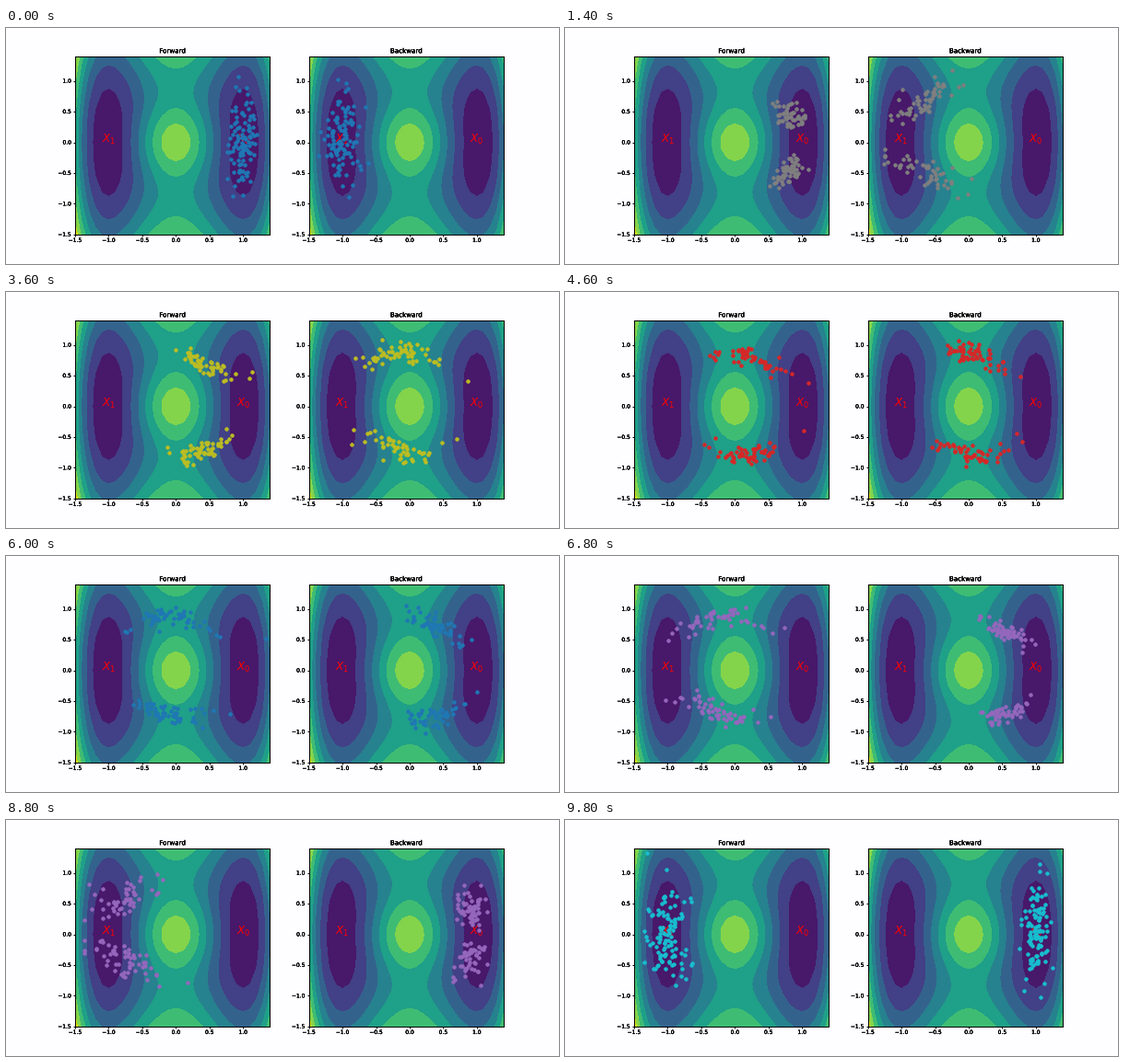
A matplotlib script for the animation above (10000 ms loop, 600 by 257 pixels).

```python
import numpy as np
import matplotlib.pyplot as plt
from matplotlib.animation import FuncAnimation
from matplotlib.patheffects import Normal

FRAMES, STEP_MS = 50, 200
COUNT = 108
K = 15 / 14  # point scale of the layout
PIXEL = 72 / 40  # one pixel in points
plt.rcParams.update({
    "font.family": "DejaVu Sans", "font.size": 10 * K,
    "axes.titlesize": 12 * K, "axes.titlepad": 6 * K, "axes.linewidth": PIXEL,
    "xtick.major.size": 3.5 * K, "ytick.major.size": 3.5 * K,
    "xtick.major.pad": 3.5 * K, "ytick.major.pad": 3.5 * K,
    "xtick.major.width": PIXEL, "ytick.major.width": PIXEL,
})
rng = np.random.default_rng(7)


def energy(x, y, delta=0.35):
    hill = np.exp(-(x**2 + y**2) / delta) / delta
    return 2.5 * (x**2 - 1)**2 + y**2 + hill


def wander(rho):
    """Stationary random motion with unit spread, one row per frame."""
    z = rng.normal(size=(FRAMES, COUNT))
    for i in range(1, FRAMES):
        z[i] = rho * z[i - 1] + np.sqrt(1 - rho**2) * z[i]
    return z


def paths(upper):
    """Walk from the right well over or under the hill to the left well."""
    p = np.linspace(0, 1, FRAMES)[:, None]
    side = np.where(rng.random(COUNT) < upper, 1, -1)
    spread = 0.11 + 0.03 * p + 0.24 * np.sin(np.pi * p**2)
    x = 1 - 2 * p**1.25 + spread * wander(0.93)
    x = np.clip(x, -1.36, 1.36)
    blur = 0.08 + 0.1 * (2 * p - 1)**2
    arc = 0.6 + 0.05 * side + 0.24 * np.cos(2.3 * (x + 0.15 * side))
    arc = arc + blur * wander(0.8)
    well = np.abs(0.42 * wander(0.95))
    # particles spread along the wells at both ends of the journey
    rest = np.clip(1 - 5 * p * (1 - p), 0, 1)
    rest = rest * np.clip((np.abs(x) - 0.5) / 0.3, 0, 1)
    return np.stack([x, side * (rest * well + (1 - rest) * arc)], axis=-1)


def strengthen(artists):
    for artist in artists:
        artist.set_path_effects([Normal()] * 4)


def panel(ax, title):
    grid = np.linspace(-1.5, 1.4, 30)
    x, y = np.meshgrid(grid, grid)
    ax.contourf(x, y, energy(x, y), np.linspace(0, 6.4, 9), cmap="viridis")
    for pos, name in ((1, "$X_0$"), (-1, "$X_1$")):
        ax.text(pos, 0, name, color="red", fontsize=20 * K,
                ha="center", zorder=1.5)
    ticks = np.arange(-1.5, 1.1, 0.5)
    ax.set(title=title, xticks=ticks, yticks=ticks,
           xlim=(-1.5, 1.4), ylim=(-1.5, 1.4))
    strengthen([ax.title, *ax.get_xticklabels(), *ax.get_yticklabels()])
    return ax.scatter([], [], s=36 * K**2, linewidths=1.5 * K, zorder=2)


fig, axes = plt.subplots(1, 2, figsize=(15, 6.425), dpi=40,
                         facecolor="#fefdff")
fig.subplots_adjust(left=0.125, right=0.9, bottom=0.125, top=0.88, wspace=0.2)
clouds = [panel(ax, name) for ax, name in zip(axes, ("Forward", "Backward"))]
tracks = [paths(0.47), paths(0.57)[::-1]]  # backward runs in reverse time


def draw(i):
    for cloud, track in zip(clouds, tracks):
        cloud.set_offsets(track[i])
        cloud.set_color(f"C{i % 10}")
    return clouds


anim = FuncAnimation(fig, draw, frames=FRAMES, interval=STEP_MS,
                     init_func=lambda: draw(0), repeat=True, repeat_delay=0)
plt.show()
```
